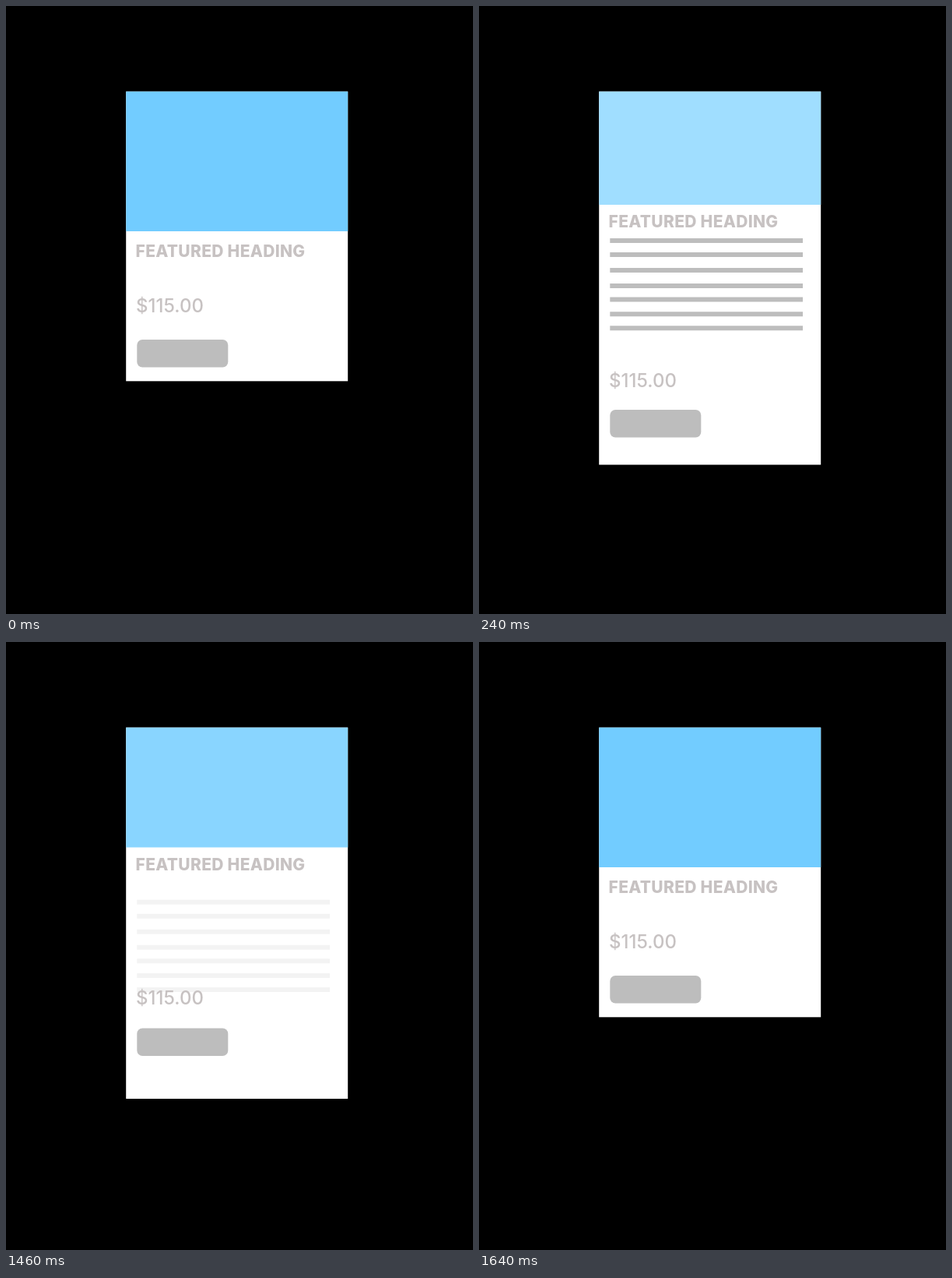
These frames come from a looping animation (600x780 px, 2640 ms). An HTML page:

```html
<!DOCTYPE html>
<html lang="en">
<head>
<meta charset="utf-8">
<title>Expanding card</title>
<style>
  html, body { margin: 0; width: 100%; height: 100%; overflow: hidden; background: #000; }
  svg { display: block; width: 600px; height: 780px; }
  text { font-family: Inter, "Open Sans", sans-serif; fill: #c7c2c2; }
  #heading { font-size: 21px; font-weight: 800; letter-spacing: .3px; }
  #price { font-size: 24px; font-weight: 500; }
</style>
</head>
<body>
<svg viewBox="0 0 600 780">
  <rect id="card" x="154.2" y="109.7" width="285" fill="#fff"/>
  <rect id="cover" x="154.2" y="109.7" width="285"/>
  <path id="lines" stroke="#bdbdbd" stroke-width="6"/>
  <text id="heading" x="166.6">FEATURED HEADING</text>
  <text id="price" x="167">$115.00</text>
  <rect id="button" x="168.3" width="117" height="35.6" rx="7" fill="#bdbdbd"/>
</svg>
<script>
const LOOP = 2640, TICK = 30, TOP = 109.7;
const $ = id => document.getElementById(id);
const set = (id, name, value) => $(id).setAttribute(name, value);
const clamp = x => Math.min(1, Math.max(0, x));
const mix = (a, b, p) => a + (b - a) * p;

set("lines", "d", [301, 319, 339, 359, 376.5, 395.3, 413.2].map(y => `M168.3 ${y}H416`).join(""));

// Step 0 is the closed card, step 9 the open one.
function stepAt(t) {
  if (t < 300) return Math.min(8, Math.floor(t / TICK));
  if (t < 1370) return 9;
  if (t < 1430) return 8;
  return Math.max(0, 7 - Math.floor((t - 1430) / TICK));
}

function draw(step) {
  const slide = clamp(step / 8);
  const grow = 1 - (1 - step / 9) ** 3.38;
  const tint = clamp((step - 4) / 5);
  const fade = clamp((step - 5.6) / 2.4);

  set("card", "height", mix(481.3, 588.6, grow) - TOP);
  set("cover", "height", mix(289, 255, slide) - TOP);
  set("cover", "fill", `rgb(${mix(114, 171, tint)}, ${mix(204, 226, tint)}, 255)`);
  set("heading", "y", mix(321.5, 283.5, slide));
  set("price", "y", mix(392.5, 489.3, slide));
  set("button", "y", mix(428, 518, slide));
  set("lines", "opacity", fade);
  set("lines", "transform", `translate(0 ${Math.max(0, 8 - step) * 16.4})`);
}

function frame() {
  draw(stepAt((performance.now() + 0.01) % LOOP));
  requestAnimationFrame(frame);
}
frame();
</script>
</body>
</html>
```
